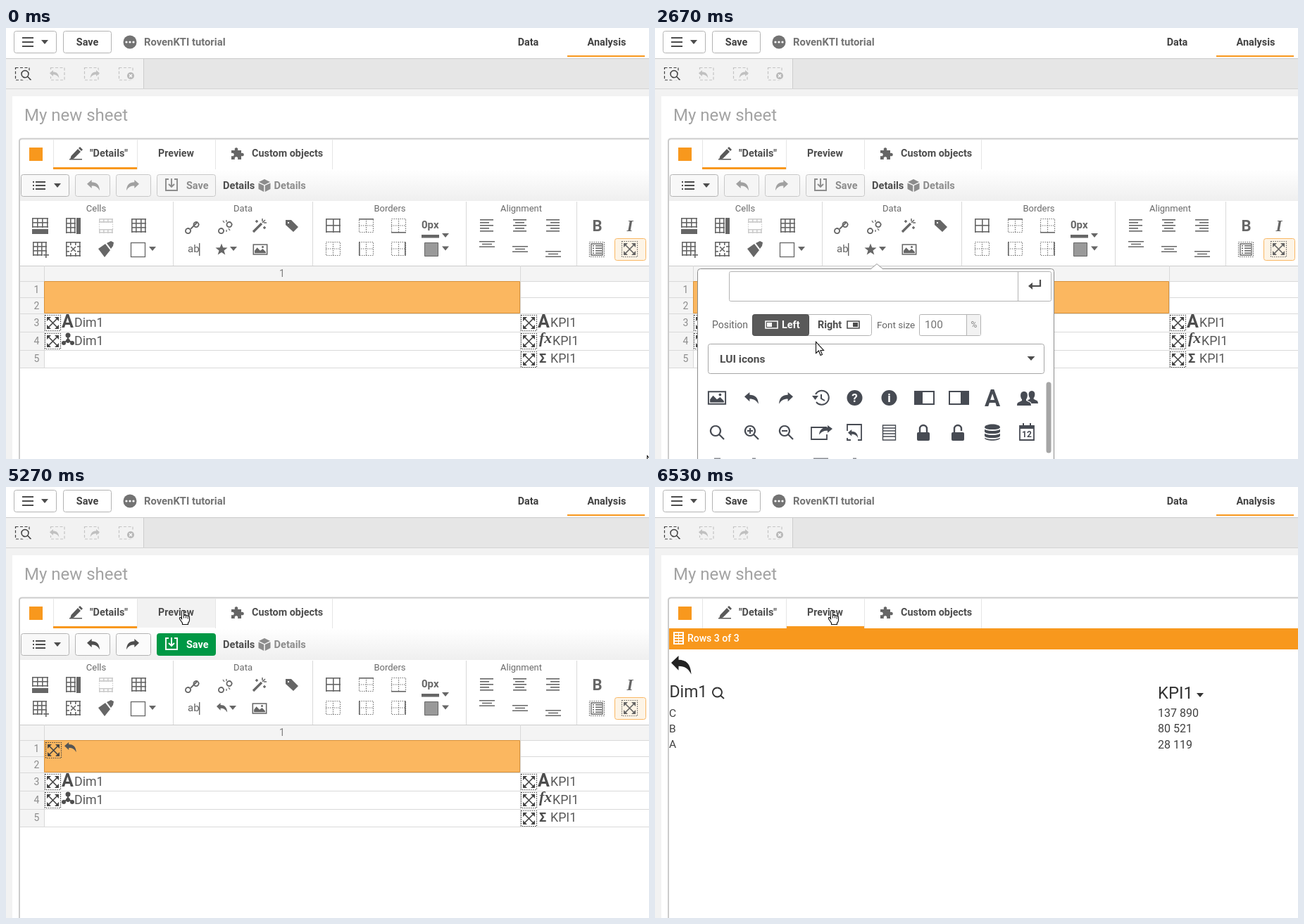
Recreate the animation shown at these times as an HTML page with a canvas. Size 913 by 613 pixels, loop 7070 ms.

```html
<!DOCTYPE html>
<html lang="en">
<head>
<meta charset="utf-8">
<title>Sheet editor</title>
<style>
html, body { margin: 0; width: 100%; height: 100%; overflow: hidden; background: #fff; }
canvas { display: block; }
</style>
</head>
<body>
<canvas id="stage" width="913" height="613"></canvas>
<script>
const g = document.getElementById('stage').getContext('2d');
const LOOP = 7070, STEP = 200 / 3;
const INK = '#4d4d4d', MID = '#666', ORANGE = '#f8981d', LINE = '#d9d9d9', NAVY = '#474b53';
const BACK = 'M0 6L7 0V3.5C14 3.5 18.5 7 19 16C16 11 13 9 7 9V12.5Z';
const clamp = v => Math.max(0, Math.min(1, v));

// Drawing helpers
function rect(x, y, w, h, c) { g.fillStyle = c; g.fillRect(x, y, w, h); }
function box(x, y, w, h, fill, stroke, r = 3) {
  g.beginPath();
  g.roundRect(x + .5, y + .5, w - 1, h - 1, r);
  if (fill) { g.fillStyle = fill; g.fill(); }
  if (stroke) { g.strokeStyle = stroke; g.lineWidth = 1; g.stroke(); }
}
function text(s, x, cy, size, c = INK, weight = 400, align = 'left', family = 'Roboto, sans-serif') {
  g.font = `${weight} ${size}px ${family}`;
  g.textAlign = align;
  g.fillStyle = c;
  g.fillText(s, x, cy + size * .355);
}
function bold(s, x, cy, size = 14.4, c = INK, align) { text(s, x, cy, size, c, 700, align); }
function at(x, y, sx, sy, draw) {
  g.save();
  g.translate(x, y);
  g.scale(sx, sy);
  draw();
  g.restore();
}
function fill(d, x, y, c = MID, sx = 1, sy = Math.abs(sx)) {
  at(x, y, sx, sy, () => { g.fillStyle = c; g.fill(new Path2D(d)); });
}
function line(d, x, y, c = MID, w = 1.5, s = 1) {
  at(x, y, s, s, () => { g.strokeStyle = c; g.lineWidth = w; g.stroke(new Path2D(d)); });
}
function disc(x, y, r, c) { g.fillStyle = c; g.beginPath(); g.arc(x, y, r, 0, 7); g.fill(); }
function dotted(x, y, w, h, c = MID) {
  g.setLineDash([1.5, 1.5]);
  g.strokeStyle = c;
  g.lineWidth = 1.2;
  g.strokeRect(x + .5, y + .5, w - 1, h - 1);
  g.setLineDash([]);
}
function caret(x, y, c = MID, w = 5) { fill(`M${-w} -3H${w}L0 3Z`, x, y, c); }
function grid(x, y, w, h, cols, rows, c = MID) {
  for (let i = 0; i <= cols; i++) rect(Math.round(x + i * (w - 2) / cols), y, 1.6, h, c);
  for (let i = 0; i <= rows; i++) rect(x, Math.round(y + i * (h - 2) / rows), w, 1.6, c);
}
function expand(x, y, s = 1, c = '#444') {
  at(x, y, s, 1, () => {
    dotted(0, 0, 23, 23, c);
    line('M5 5L18 18M18 5L5 18', 0, 0, c, 1.6);
    fill('M3 3H9L3 9ZM20 3V9L14 3ZM3 20V14L9 20ZM20 20H14L20 14Z', 0, 0, c);
  });
}
function lens(x, y, c, sign) {
  line('M0 -7A7 7 0 1 1 -.1 -7M5 5L12 12', x - 2, y - 1, c, 2.2);
  if (sign) rect(x - 6, y - 2, 8, 2, c);
  if (sign === '+') rect(x - 3, y - 5, 2, 8, c);
}
function picture(x, y, c, s = 1) {
  line('M-11 -8H11V8H-11Z', x, y, c, 1.8, s);
  fill('M-9 6V2L-5 -3L0 2L4 -1L9 4V6Z', x, y, c, s);
  disc(x + 4 * s, y - 4 * s, 1.7 * s, c);
}
function download(x, y, c) {
  line('M5 1H1V17H17V1H13M9 0V11M5 8L9 12L13 8', x, y, c, 1.9);
}
function table(x, y, c) {
  rect(x, y, 15, 18, c);
  for (let r = 0; r < 4; r++) for (let q = 0; q < 2; q++)
    rect(x + 2 + q * 6, y + 2 + r * 4, 5, 2.2, ORANGE);
}

function pageFrame(preview, hover) {
  rect(0, 0, 913, 613, '#fff');
  box(11, 4, 61, 32, '#fff', '#b3b3b3');
  for (const y of [13, 19, 25]) rect(23, y, 16, 2, INK);
  caret(55, 20, INK);
  box(81, 4, 69, 32, '#fff', '#b3b3b3');
  bold('Save', 115.5, 20, 14.4, '#404040', 'center');
  disc(176, 20, 9.5, '#737373');
  for (const x of [171, 176, 181]) disc(x, 20, 1.6, '#fff');
  bold('RovenKTI tutorial', 196, 20, 14.8, '#737373');
  bold('Data', 741.5, 19.5, 14.4, '#404040', 'center');
  bold('Analysis', 853, 19.5, 14.4, '#404040', 'center');
  rect(0, 43, 913, 1, '#ccc');
  rect(797, 39, 110, 2, ORANGE);

  rect(0, 44, 913, 569, '#f2f2f2');
  rect(196, 44, 717, 42, '#e6e6e6');
  rect(195, 44, 1, 42, '#ccc');
  rect(0, 86, 913, 1, '#d4d4d4');
  [['#404040', 13], ['#c4c4c4', 63], ['#c4c4c4', 111], ['#c4c4c4', 160]].forEach(([c, x], i) => {
    g.setLineDash([4, 2.5]);
    line('M.5 .5H20V18H.5Z', x, 56, c, 1.2);
    g.setLineDash([]);
    if (!i) {
      disc(x + 15, 67, 8, '#f2f2f2');
      line('M5 0A5 5 0 1 1 5 -.1M3.5 3.5L8.5 8.5', x + 14, 65.5, c, 1.5);
    } else if (i < 3) {
      rect(x + (i > 1 ? 6 : 0), 59, 14, 10, '#f2f2f2');
      fill(BACK, x + (i > 1 ? 22 : -1), 60, '#c0c0c0', i > 1 ? -.7 : .7);
    } else {
      disc(x + 17, 68, 6.5, '#f2f2f2');
      disc(x + 17, 68, 5, '#b8b8b8');
      line('M-2 -2L2 2M2 -2L-2 2', x + 17, 68, '#fff', 1.3);
    }
  });

  rect(9, 97, 904, 516, '#fff');
  text('My new sheet', 26, 123, 24, '#a3a3a3');
  g.strokeStyle = '#ccc';
  g.lineWidth = 2;
  g.stroke(new Path2D('M19 613V161Q19 157.5 23 157.5H913'));

  if (hover) rect(187, 159, 110, 41, '#f2f2f2');
  for (const x of [67, 186, 297, 463]) rect(x, 158, 1, 43, '#e6e6e6');
  rect(33, 170, 19, 19, ORANGE);
  fill('M0 17L1.5 12L11 2L15 6L5.5 15.5ZM12 1L14 -1L18 3L16 5Z', 91, 170, '#595959');
  rect(90, 186, 18, 1.5, '#595959');
  bold('"Details"', 119, 178);
  bold('Preview', 241.5, 178, 14.2, INK, 'center');
  fill('M0 5H5C3 0 11 0 9 5H14V9C19 7 19 15 14 13V18H9C11 13 3 13 5 18H0V13C5 15 5 7 0 9Z', 320, 169, '#666');
  bold('Custom objects', 349, 178);
  rect(preview ? 187 : 67, 198, preview ? 110 : 119, 3, ORANGE);
}

function toolbar(edited) {
  const shade = g.createLinearGradient(0, 201, 0, 246);
  shade.addColorStop(0, '#fff');
  shade.addColorStop(1, '#efefef');
  rect(20, 201, 893, 45, shade);
  box(21, 208, 69, 32, '#f8f8f8', '#b3b3b3');
  for (const y of [218, 223, 228]) { rect(38, y, 2, 2, INK); rect(42, y, 14, 2, INK); }
  caret(73, 224, INK);
  const icon = edited ? INK : '#a0a0a0';
  for (const x of [98, 156]) box(x, 208, 50, 32, edited ? '#fbfbfb' : '#f5f5f5', edited ? '#b3b3b3' : '#c8c8c8');
  fill(BACK, 115, 216, icon, .95);
  fill(BACK, 189, 216, icon, -.95);
  box(214, 208, 84, 32, edited ? '#009845' : '#f5f5f5', edited ? '#009845' : '#c8c8c8');
  download(226, 214, edited ? '#fff' : '#8c8c8c');
  bold('Save', 256, 224, 14.4, edited ? '#fff' : '#8c8c8c');
  bold('Details', 308, 224, 14.6);
  fill('M0 -9L8 -5L0 -1L-8 -5ZM-8.5 -3.5L-.8 0V9L-8.5 5ZM8.5 -3.5L.8 0V9L8.5 5Z', 367, 224, '#8c8c8c');
  bold('Details', 380.5, 224, 14.6, '#8c8c8c');

  rect(20, 246, 893, 92, '#fff');
  for (const x of [237, 435, 653, 810]) rect(x, 247, 1, 91, LINE);
  [['Cells', 128], ['Data', 336.5], ['Borders', 545], ['Alignment', 731.5]]
    .forEach(([s, x]) => text(s, x, 256, 13, '#6b6b6b', 400, 'center'));

  // Cells
  grid(37, 270, 23, 14, 3, 2);
  rect(37, 286, 23, 7, MID);
  grid(85, 270, 14, 22, 2, 3);
  rect(100, 270, 6, 23, MID);
  grid(132, 271, 20, 6, 3, 1, '#ccc');
  grid(132, 286, 20, 6, 3, 1, '#ccc');
  dotted(132, 276, 20, 11, '#ccc');
  grid(178, 271, 21, 20, 3, 3);
  grid(38, 304, 20, 20, 3, 3);
  rect(52, 319, 10, 8, '#fff');
  rect(53, 322, 8, 1.6, MID);
  rect(56, 318, 1.6, 9, MID);
  grid(85, 304, 21, 21, 3, 3);
  rect(90, 309, 11, 11, '#fff');
  line('M0 0L7 7M7 0L0 7', 92, 311, MID, 1.6);
  fill('M0 10L10 3L17 12L9 22L6 18ZM12 2L18 -1L22 1L21 6L18 10Z', 131, 304, '#666');
  g.strokeStyle = MID;
  g.lineWidth = 1.3;
  g.strokeRect(177.5, 305.5, 20, 20);
  caret(208, 314);

  // Data
  const link = 'M-3 3A3.6 3.6 0 1 0 -2.9 3.1M8.5 -6A3.6 3.6 0 1 0 8.6 -5.9';
  line(link, 264, 283, MID, 1.8);
  line('M-5 4L4 -5', 267, 282, MID, 1.8);
  line(link, 311, 283, MID, 1.8);
  line('M-5 -7L-3 -4M0 -8V-5M5 7L3 4M0 9V6', 313, 281, MID, 1.3);
  line('M-9 9L3 -3', 360, 281, MID, 3.2);
  line('M4 -4L8 -8M4 -10V-6M10 -4H6M-4 -8V-4M-6 -6H-2M7 1V5M5 3H9', 360, 281, MID, 1.5);
  fill('M-9 -8H-1L9 2L2 9L-9 -1ZM-6 -5V-3H-4V-5Z', 406, 281);
  text('ab', 258, 314, 15, MID);
  rect(274, 306, 1.4, 18, MID);
  if (edited) fill(BACK, 299, 307, MID, .8, .85);
  else fill('M0 -8.5L2.2 -2.7L8.5 -2.5L3.5 1.4L5.3 7.5L0 4L-5.3 7.5L-3.5 1.4L-8.5 -2.5L-2.2 -2.7Z', 306, 315);
  caret(edited ? 322 : 323, 314);
  picture(edited ? 360 : 361, 315, MID, .88);

  // Borders: one solid side each on a dotted grid
  grid(454, 271, 21, 20, 2, 2);
  [[501, 271, 't'], [547, 271, 'b'], [454, 304, ''], [501, 304, 'l'], [547, 304, 'r']].forEach(([x, y, side]) => {
    dotted(x, y, 21, 20, '#777');
    g.setLineDash([1.5, 1.5]);
    line('M10.5 0V20M0 10H21', x, y, '#777', 1.2);
    g.setLineDash([]);
    if (side === 't' || side === 'b') rect(x, side === 't' ? y : y + 19, 21, 1.6, MID);
    else if (side) rect(side === 'l' ? x : x + 19, y, 1.6, 20, MID);
  });
  bold('0px', 590, 280, 15, MID);
  rect(590, 294, 25, 4.5, MID);
  caret(624, 295);
  box(594, 305, 20, 20, '#999', MID, 0);
  caret(624, 313.5);

  // Alignment
  [[673, 0], [720, .5], [767, 1]].forEach(([x, a]) => {
    for (let i = 0; i < 5; i++) {
      const w = i % 2 ? 13 : 19;
      rect(x + (19 - w) * a, 272 + i * 4, w, 1.6, MID);
    }
  });
  [[672, 303], [719, 310], [766, 317]].forEach(([x, y]) => {
    rect(x, y, 22, 1.5, MID);
    rect(x + 4, y + 3.7, 14, 1.5, MID);
    rect(x, y + 7.4, 22, 1.5, MID);
  });
  bold('B', 839.5, 281, 22, MID, 'center');
  text('I', 886, 281, 23, MID, 'italic 700', 'center', 'Liberation Serif, serif');
  dotted(828, 304, 22, 22);
  line('M3 3H19V19H3Z', 828, 304, MID, 1.3);
  for (let i = 0; i < 4; i++) { rect(833, 309 + i * 3.5, 2, 1.5, MID); rect(837, 309 + i * 3.5, 9, 1.5, MID); }
  box(864, 299, 45, 32, '#fdf4e6', '#f9b763');
  expand(874, 303, 1, MID);
}

function sheetGrid(k) {
  rect(20, 338, 893, 22, '#f4f4f4');
  rect(20, 360, 34, 124, '#f4f4f4');
  for (const y of [338, 360, 383, 406, 432, 458, 483]) rect(20, y, 893, 1, y === 338 ? '#ccc' : LINE);
  rect(54, 338, 1, 146, LINE);
  rect(730, 338, 1, 146, LINE);
  text('1', 392, 349, 14, '#808080', 400, 'center');
  [372, 395, 419, 445, 470].forEach((y, i) => text(i + 1, 43.5, y, 14, '#8c8c8c', 400, 'center'));
  box(54, 360, 676, 46, '#fbb760', '#d9923a', 0);

  for (const y of [408, 434]) expand(55, y);
  for (const y of [408, 434, 460]) expand(731, y);
  bold('A', 79, 417, 25);
  bold('A', 755, 417, 25);
  disc(88, 437, 3.5, INK);
  line('M0 0V7L-7 11M0 7L7 11', 88, 437, INK, 2);
  for (const x of [82, 88, 94]) disc(x, x === 88 ? 445 : 448, 3, INK);
  text('fx', 757, 440, 22, INK, 'italic 700', 'left', 'Liberation Serif, serif');
  bold('Σ', 757, 470, 18);
  [[97, 419, 'Dim1'], [97, 445, 'Dim1'], [773, 419, 'KPI1'], [776, 445, 'KPI1'], [773, 470, 'KPI1']]
    .forEach(([x, y, s]) => text(s, x, y, 17.8, '#595959'));

  // New icon slides into the selected cell
  if (k >= 52) {
    const rest = k < 57 ? 0 : Math.pow(1 - clamp((k - 57) / 11), 2);
    const s = 1 - .6 * rest;
    expand(56 + 207 * rest, 363, s);
    fill(BACK, 56 + 207 * rest + 27 * s, 363, '#555', .88 * s, .88);
  }
}

function popover(alpha) {
  g.save();
  g.globalAlpha = alpha;
  box(60, 342, 507, 290, '#fff', '#8c8c8c', 4);
  fill('M-9 8L0 0L9 8Z', 315, 335.5, '#fff');
  line('M-9 7.5L0 0L9 7.5', 315, 335.5, '#999', 1);

  box(105, 346, 458, 43, null, '#b3b3b3', 2);
  rect(515, 347, 1, 41, '#b3b3b3');
  line('M16 0V9H3', 531, 358, INK, 2.2);
  fill('M0 9L6 4V14Z', 530, 358, INK);
  text('Position', 81, 422, 14, MID);
  box(138, 407, 170, 31, '#fff', '#b3b3b3');
  box(138, 407, 81, 31, '#595959', '#4d4d4d');
  const side = (x, c, d) => { line('M0 0H17V10H0Z', x, 417, c, 1.6); rect(x + d, 419, 7, 6, c); };
  side(157, '#fff', 2);
  bold('Left', 180, 422, 14.4, '#fff');
  bold('Right', 231, 422, 14.4);
  side(273, INK, 8);
  text('Font size', 315, 422, 13.5, MID);
  box(375, 407, 88, 31, '#fff', '#b3b3b3', 2);
  rect(443, 408, 19, 29, '#f2f2f2');
  rect(442, 408, 1, 29, '#b3b3b3');
  text('100', 383, 422, 15.3, '#737373');
  text('%', 453, 422, 12, '#808080', 400, 'center');
  box(75, 449, 478, 43, '#fff', '#a6a6a6');
  bold('LUI icons', 92, 470, 15.5);
  caret(534, 470, INK, 5.5);

  // First icon row
  picture(88, 526, NAVY, 1.1);
  fill(BACK, 127, 518, NAVY, 1.05);
  fill(BACK, 196, 518, NAVY, -1.05);
  line('M-8 -5A10 10 0 1 1 -7 6M0 -5V1L5 4', 236, 526, NAVY, 2);
  fill('M-13 -3H-4L-8.5 3Z', 236, 526, NAVY);
  for (const [x, s] of [[283.5, '?'], [332.5, 'i']]) {
    disc(x, 526, 11, NAVY);
    bold(s, x, 526, 17, '#fff', 'center');
  }
  for (const [x, d] of [[368, 2], [417, 17]]) {
    line('M1 1H28V19H1Z', x, 516, NAVY, 2);
    rect(x + d, 517, 10, 18, NAVY);
  }
  bold('A', 479, 526, 33, NAVY, 'center');
  const head = 'M0 -10C7 -10 5 0 3 1V3L9 6Q10 9 10 10H-10Q-10 7 -9 6L-3 3V1C-5 0 -7 -10 0 -10Z';
  fill(head, 535, 525, NAVY, .9);
  line(head, 524, 527, '#fff', 2);
  fill(head, 524, 527, NAVY);

  // Second icon row
  lens(88, 574, NAVY);
  lens(137, 574, NAVY, '+');
  lens(186, 574, NAVY, '-');
  line('M9 -6H-13V11H9V4', 235, 574, NAVY, 1.8);
  fill(BACK, 252, 565, NAVY, -1, .85);
  line('M5 11H10V-11H-10V-2M-10 8V11H-5', 283, 575, NAVY, 1.8);
  fill(BACK, 274, 571, NAVY, .75);
  line('M-9 -10H9V11H-9ZM-9 -6H9M-9 -2H9M-9 2H9M-9 6H9', 332.5, 575, NAVY, 1.4);
  for (const [x, open] of [[381, 0], [430, 1]]) {
    box(x - 9, 575, 18, 12, NAVY, NAVY, 1);
    line(`M-5 2V-4A5 5 0 0 1 5 -4V${open ? -1 : 2}`, x, 574, NAVY, 2.4);
  }
  fill('M-11 -7C-11 -13 11 -13 11 -7V8C11 13 -11 13 -11 8Z', 479, 575, NAVY);
  for (const y of [569, 575, 581]) line('M-11.5 0C-9 4 9 4 11.5 0', 479, y, '#fff', 1.8);
  line('M-10 -9H10V11H-10Z', 528, 575, NAVY, 1.8);
  rect(518, 565, 20, 5, NAVY);
  rect(522, 562, 2, 5, NAVY);
  rect(532, 562, 2, 5, NAVY);
  bold('12', 528, 578, 12, NAVY, 'center');
  for (const [x, w] of [[84, 9], [138, 5], [225, 21], [281, 5]]) rect(x, 611.5, w, 1.5, '#8b8e94');
  box(555, 503, 8, 102, '#a6a6a6', null, 4);
  g.restore();
}

function tooltip() {
  g.save();
  g.shadowColor = 'rgba(0,0,0,.2)';
  g.shadowBlur = 3;
  g.shadowOffsetX = g.shadowOffsetY = 1;
  box(131, 542, 95, 21, '#fff', '#ccc', 0);
  g.restore();
  text('lui-icon--back', 137.5, 552, 14, '#b0b0b0');
}

function preview(k) {
  if (k < 85) return;
  const fade = clamp((k - 83) / 10);
  const skew = k < 90 ? 14 : k < 94 ? 14 - 19 * (k - 90) / 4 : -5 * clamp((98 - k) / 4);
  const late = k < 90 ? 1 : clamp((98 - k) / 8);
  g.save();
  g.beginPath();
  g.rect(20, 201, 893, 30);
  g.clip();
  g.globalAlpha = fade;
  g.translate(20, 216);
  g.transform(1, 0, Math.tan(skew * Math.PI / 180), 1 - .06 * late, 3 * late, 0);
  g.translate(-20, -216);
  rect(20, 201, 920, 30, ORANGE);
  table(26, 206, '#fff');
  text('Rows 3 of 3', 46, 215.5, 14, '#fff', 500);
  g.restore();

  fill(BACK, 23, 240, '#222', 1.5, 1.65);
  text('Dim1', 20.5, 291, 23, '#333');
  line('M0 -6.5A6.5 6.5 0 1 1 -.1 -6.5M4.5 4.5L9.5 9', 88.5, 292, '#333', 1.8);
  text('KPI1', 714, 292.5, 23.8, '#333');
  caret(774, 296, '#333');
  [['C', '137 890'], ['B', '80 521'], ['A', '28 119']].forEach(([name, value], i) => {
    const y = 321.5 + i * 22.2;
    text(name, 20, y, 15.5, '#404040');
    text(value, 714, y, 16, '#404040');
  });
}

// Pointer stops: step, x, y and easing toward that stop
const PATH = [
  [3, 910, 608], [14, 352, 393, 'both'], [21, 309, 317, 'out'], [31, 309, 317],
  [42, 188, 510, 'in'], [45, 131, 517, 'out'], [61, 131, 517],
  [72, 155, 477, 'in'], [79, 251, 175, 'out']
];
const EASE = {
  in: p => p * p,
  out: p => 1 - (1 - p) * (1 - p),
  both: p => p * p * (3 - 2 * p)
};
function pointer(k) {
  let i = 1;
  while (i < PATH.length - 1 && PATH[i][0] < k) i++;
  const [k0, x0, y0] = PATH[i - 1], [k1, x1, y1, ease] = PATH[i];
  const raw = clamp((k - k0) / (k1 - k0));
  const p = ease ? EASE[ease](raw) : raw;
  const x = Math.round(x0 + (x1 - x0) * p), y = Math.round(y0 + (y1 - y0) * p);
  const hand = (k >= 19 && k <= 32) || (k >= 42 && k <= 60) || k >= 78;
  const d = hand
    ? 'M-2 12V1.5Q-2 0 -.5 0T1 1.5V7Q3 6 4 7.5Q6 6.5 6.7 8.2Q9 7.5 9 10V14Q9 16 7 18V20H-1V18L-5 12Q-5.5 9.5 -3.5 10Z'
    : 'M0 0V16L4 12.5L6.5 19L9 18L6.5 12H11Z';
  fill(d, x + .5, y + .5, '#fff');
  line(d, x + .5, y + .5, '#111', 1.1);
  if (hand) line('M1 7V11M4 8V11M6.7 9V12', x + .5, y + .5, '#111', 1);
}

function draw(t) {
  const k = Math.floor((t + 3.4) / STEP);
  const showPreview = k >= 83;
  pageFrame(showPreview, k >= 78 && !showPreview);
  if (showPreview) preview(k);
  else {
    toolbar(k >= 52);
    sheetGrid(k);
    const alpha = k < 57 ? clamp((k - 23) / 5.6) : clamp((61 - k) / 5);
    if (alpha) popover(alpha);
    if (k >= 53 && k <= 57) tooltip();
  }
  pointer(k);
}

const start = performance.now();
function tick() {
  draw((performance.now() - start) % LOOP);
  requestAnimationFrame(tick);
}
tick();
</script>
</body>
</html>
```
